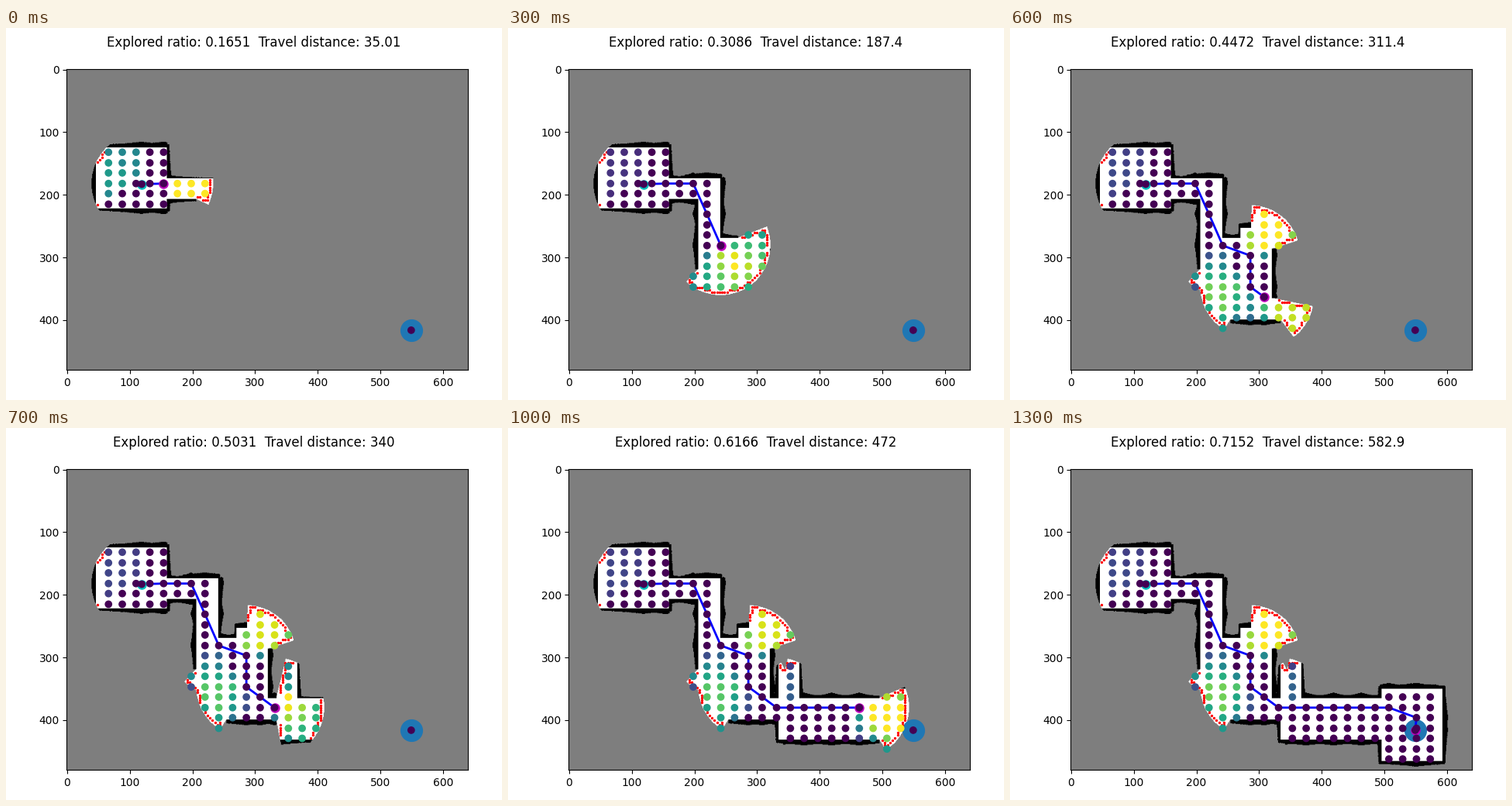
A matplotlib script that plays this animation: 640 px wide and 480 px high, repeating every 1.4 s.

```python
import math

import matplotlib.pyplot as plt
import numpy as np
from matplotlib.animation import FuncAnimation

WIDTH, HEIGHT = 640, 480
WALL, UNKNOWN, FREE = 1, 127, 255
SENSOR_RANGE = 80
VIEW_RANGE = 70
WALL_DEPTH = 10
CELL = 4

# Free space as (left, right, top, bottom).
ROOMS = [
    (47, 160, 126, 223),
    (160, 242, 175, 208),
    (207, 242, 175, 270),
    (207, 321, 270, 400),
    (180, 255, 320, 425),
    (271, 321, 254, 270),
    (288, 400, 190, 287),
    (335, 368, 280, 366),
    (321, 335, 366, 400),
    (335, 496, 366, 432),
    (496, 593, 351, 466),
]

GRID_X = np.linspace(0, WIDTH - 1, 30).round().astype(int)
GRID_Y = np.linspace(0, HEIGHT - 1, 30).round().astype(int)
START, GOAL = (119, 183), (549, 416)
STOPS = [(7, 11), (9, 11), (10, 14), (11, 17), (13, 18), (13, 21), (14, 22),
         (15, 23), (17, 23), (19, 23), (21, 23), (23, 23), (25, 24)]
ROUTE = [START] + [(int(GRID_X[i]), int(GRID_Y[j])) for i, j in STOPS] + [GOAL]
RATIOS = [0.1651, 0.1842, 0.2116, 0.3086, 0.3795, 0.4268, 0.4472,
          0.5031, 0.5422, 0.5786, 0.6166, 0.6846, 0.7131, 0.7152]


def build_world():
    world = np.full((HEIGHT, WIDTH), WALL, dtype=np.uint8)
    for left, right, top, bottom in ROOMS:
        world[top:bottom, left:right] = FREE
    return world


def line_cells(start, end):
    """Yield the grid cells from start up to, but not including, end."""
    (x, y), (x1, y1) = start, end
    dx, dy = abs(x1 - x), abs(y1 - y)
    step_x = 1 if x1 > x else -1
    step_y = 1 if y1 > y else -1
    error = dx - dy
    while (x, y) != (x1, y1):
        yield x, y
        if error > 0:
            x += step_x
            error -= 2 * dy
        else:
            y += step_y
            error += 2 * dx


def scan(world, belief, position):
    """Reveal what the range sensor sees, including a thin skin of wall."""
    x0, y0 = position
    for angle in np.radians(np.arange(0, 360, 0.5)):
        end = (round(x0 + math.cos(angle) * SENSOR_RANGE),
               round(y0 + math.sin(angle) * SENSOR_RANGE))
        hits = 0
        for x, y in line_cells(position, end):
            if not (0 <= x < WIDTH and 0 <= y < HEIGHT):
                break
            value = world.item(y, x)
            if value == WALL:
                hits += 1
                if hits >= WALL_DEPTH:
                    break
            elif hits:
                break
            belief[y, x] = value


def find_frontiers(belief):
    rows, cols = HEIGHT // CELL, WIDTH // CELL
    coarse = belief.reshape(rows, CELL, cols, CELL).min(axis=(1, 3))
    unknown = np.pad(coarse == UNKNOWN, 1).astype(int)
    count = sum(unknown[dy:dy + rows, dx:dx + cols]
                for dy in range(3) for dx in range(3))
    ys, xs = np.where((coarse == FREE) & (count > 1) & (count < 8))
    return np.column_stack([xs, ys]) * CELL


def utility(belief, node, frontiers, visited):
    """Number of frontier points in clear view of a node."""
    if node in visited:
        return 0
    gaps = np.hypot(*(frontiers - node).T)
    near = frontiers[gaps < VIEW_RANGE].tolist()
    seen = sum(all(belief.item(y, x) == FREE
                   for x, y in line_cells(node, tuple(point)))
               for point in near)
    return seen if seen > 5 else 0


def explore():
    world = build_world()
    belief = np.full_like(world, UNKNOWN)
    scan(world, belief, START)
    states = []
    for step in range(1, len(ROUTE)):
        scan(world, belief, ROUTE[step])
        visited = ROUTE[:step + 1]
        frontiers = find_frontiers(belief)
        nodes = [(int(x), int(y)) for x in GRID_X for y in GRID_Y
                 if belief[y, x] == FREE]
        values = [utility(belief, node, frontiers, visited) for node in nodes]
        states.append((belief.copy(), frontiers, nodes + [START, GOAL],
                       values + [0, 0], np.array(visited)))
    return states


STATES = explore()

fig, ax = plt.subplots(figsize=(WIDTH / 100, HEIGHT / 100), dpi=100)
image = ax.imshow(STATES[0][0], cmap="gray", vmin=WALL, vmax=FREE)
node_dots = ax.scatter([0], [0], c=[0], cmap="viridis", zorder=5)
frontier_dots = ax.scatter([0], [0], c="r", s=2, zorder=3)
ax.plot(*GOAL, "o", color="C0", markersize=20)
path, = ax.plot([], [], "b", linewidth=2)
robot, = ax.plot([], [], "mo", markersize=8)
ax.plot(*START, "co", markersize=8)
ax.set(xlim=(-0.5, WIDTH - 0.5), ylim=(HEIGHT - 0.5, -0.5))
title = fig.suptitle("")


def draw(frame):
    belief, frontiers, nodes, values, trail = STATES[frame]
    image.set_data(belief)
    frontier_dots.set_offsets(frontiers)
    node_dots.set_offsets(nodes)
    node_dots.set_array(np.array(values))
    node_dots.set_clim(0, max(values))
    path.set_data(trail[:, 0], trail[:, 1])
    robot.set_data(trail[-1:, 0], trail[-1:, 1])
    travelled = np.hypot(*np.diff(trail, axis=0).T).sum()
    title.set_text(f"Explored ratio: {RATIOS[frame]:.4g}  "
                   f"Travel distance: {travelled:.4g}")
    return image, node_dots, frontier_dots, path, robot, title


draw(0)
fig.tight_layout()
animation = FuncAnimation(fig, draw, frames=len(STATES), interval=100,
                          init_func=lambda: draw(0), repeat=True)
plt.show()
```
